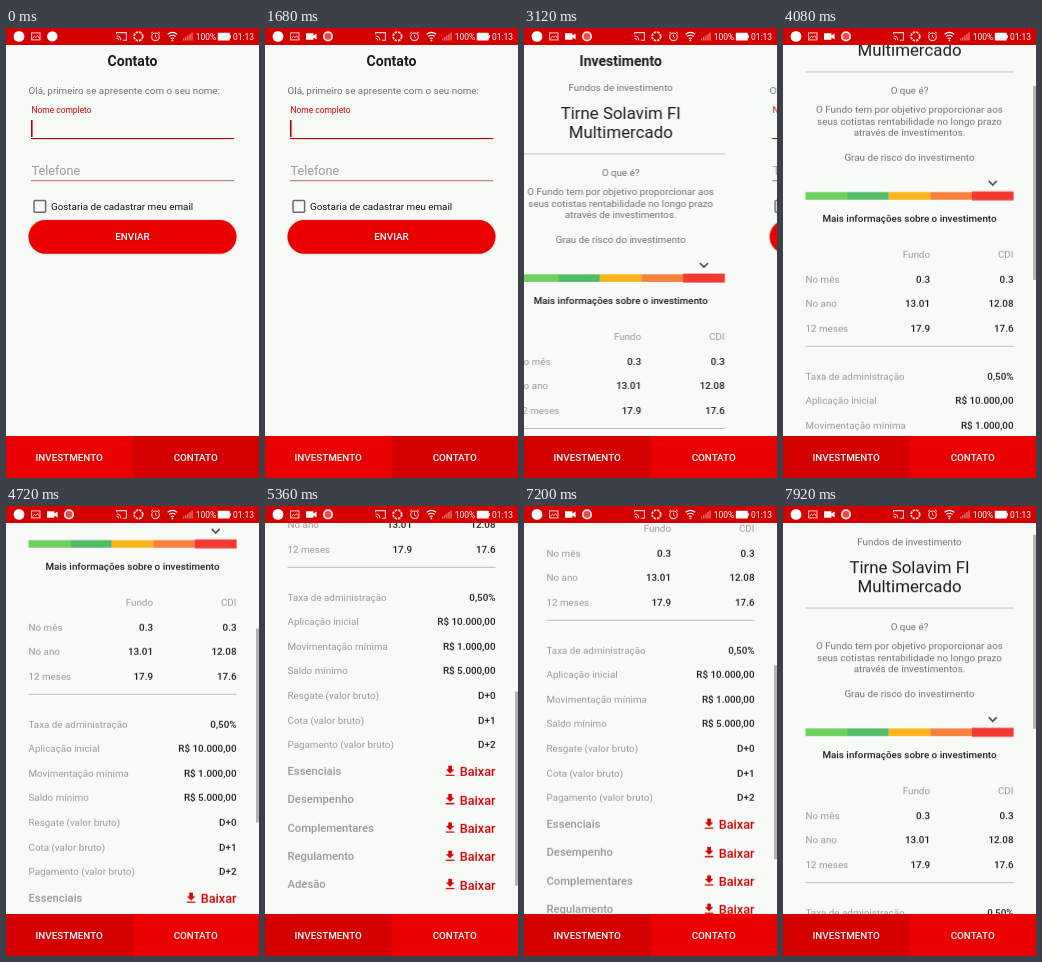
These frames come from a looping animation (253x450 px, 8 s). An HTML page:

```html
<!DOCTYPE html>
<html lang="pt-BR">
<head>
<meta charset="utf-8">
<title>Investimento</title>
<style>
  html, body { margin: 0; width: 100%; height: 100%; overflow: hidden; background: #f8faf8; }
  svg { display: block; width: 100vw; height: 100vh; }
  text { font-family: Roboto, sans-serif; font-size: 9.84px; white-space: pre; }
  .medium { font-weight: 500; }
  .bold { font-weight: 700; }
</style>
</head>
<body>
<svg id="stage" viewBox="0 0 253 450"></svg>
<script>
const LOOP = 8000;
const RED = '#eb0000', DARK = '#d40000', INK = '#1c1c1c', GREY = '#707070', PALE = '#979797';
const stage = document.getElementById('stage');

function add(parent, tag, attrs = {}, content) {
  const el = document.createElementNS('http://www.w3.org/2000/svg', tag);
  for (const key in attrs) el.setAttribute(key, attrs[key]);
  if (content !== undefined) el.textContent = content;
  parent.append(el);
  return el;
}
const group = (parent, attrs) => add(parent, 'g', attrs);
const rect = (parent, x, y, width, height, fill, more) =>
  add(parent, 'rect', { x, y, width, height, fill, ...more });
const circle = (parent, cx, cy, r, more) => add(parent, 'circle', { cx, cy, r, ...more });
const line = (parent, d, stroke, width = 1, more) =>
  add(parent, 'path', { d, stroke, 'stroke-width': width, fill: 'none', ...more });

function label(parent, content, x, y, fill, { size = 9.84, weight = '', anchor = 'start' } = {}) {
  return add(parent, 'text',
    { x, y, fill, class: weight, 'text-anchor': anchor, style: `font-size:${size}px` }, content);
}
const centred = (parent, content, y, fill, options) =>
  label(parent, content, 126.5, y, fill, { anchor: 'middle', ...options });
const rightAligned = (parent, content, x, y, fill, options) =>
  label(parent, content, x, y, fill, { anchor: 'end', ...options });

function button(parent, content, y) {
  rect(parent, 22.5, y, 208, 33.7, RED,
    { rx: 16.85, style: 'filter:drop-shadow(0 .7px 1px rgba(0,0,0,.28))' });
  centred(parent, content, y + 20.4, '#fff', { weight: 'medium' });
}

// Each step is [time in ms, value, easing to the next step].
function play(el, steps, toStyle) {
  const all = [[0, steps[0][1]], ...steps, [LOOP, steps.at(-1)[1]]];
  el.animate(all.map(([time, value, easing = 'linear']) =>
    ({ offset: time / LOOP, easing, ...toStyle(value) })),
    { duration: LOOP, iterations: Infinity });
}
const opacity = value => ({ opacity: value });
const HOLD = 'step-end';

function drawContact(parent) {
  const page = group(parent);
  centred(page, 'Contato', 38, INK, { size: 14.06, weight: 'bold' });
  label(page, 'Olá, primeiro se apresente com o seu nome:', 22.5, 65.8, GREY);
  label(page, 'Nome completo', 25.5, 84.8, DARK, { size: 8.44 });
  const cursor = rect(page, 25, 92, 1.6, 17, '#b00000');
  rect(page, 25, 110, 203, 1.1, '#b40000');
  label(page, 'Telefone', 25.5, 146.7, '#9d9d9d', { size: 12.65 });
  rect(page, 25, 152.2, 203, 1, '#b86a6a');
  rect(page, 28, 172.6, 11.6, 11.6, 'none', { rx: 1, stroke: '#6a6a6a', 'stroke-width': 1.5 });
  label(page, 'Gostaria de cadastrar meu email', 45, 182, '#111');
  button(page, 'ENVIAR', 192);
  play(cursor, [[0, 1, HOLD], [240, 0, HOLD], [720, 1, HOLD], [1200, 0, HOLD],
    [1680, 1, HOLD], [2160, 0, HOLD], [2640, 1, HOLD], [3120, 0, HOLD]], opacity);
  return page;
}

function drawFund(parent) {
  const page = group(parent);
  const body = group(page);
  centred(body, 'Investimento', 38, INK, { size: 14.06, weight: 'bold' });
  centred(body, 'Fundos de investimento', 63, GREY);
  centred(body, 'Tirne Solavim FI', 90.5, INK, { size: 16.87 });
  centred(body, 'Multimercado', 110.3, INK, { size: 16.87 });
  rect(body, 22.5, 125.5, 208, 1, '#bdbdbd');
  centred(body, 'O que é?', 148.3, GREY);
  ['O Fundo tem por objetivo proporcionar aos',
   'seus cotistas rentabilidade no longo prazo',
   'através de investimentos.'
  ].forEach((text, i) => centred(body, text, 167 + i * 11.6, GREY));
  centred(body, 'Grau de risco do investimento', 215.1, GREY);

  line(body, 'M205.7 235.1l4 4 4-4', '#444', 1.5);
  ['#6fd05f', '#52bb66', '#fbb41c', '#f7803a', '#f23a32'].forEach((fill, i) => {
    const grow = i === 4 ? 0.7 : 0;
    rect(body, 22.5 + i * 41.6, 246.3 - grow, 41.7, 7.6 + grow * 2, fill);
  });
  centred(body, 'Mais informações sobre o investimento', 276, INK, { weight: 'medium' });

  rightAligned(body, 'Fundo', 147, 312, PALE);
  rightAligned(body, 'CDI', 230.5, 312, PALE);
  [['No mês', '0.3', '0.3'], ['No ano', '13.01', '12.08'], ['12 meses', '17.9', '17.6']]
    .forEach(([name, fund, index], i) => {
      const y = 336.8 + i * 24.6;
      label(body, name, 22.5, y, PALE);
      rightAligned(body, fund, 147, y, INK, { weight: 'medium' });
      rightAligned(body, index, 230.5, y, INK, { weight: 'medium' });
    });
  rect(body, 22.5, 400, 208, 1, '#bdbdbd');

  [['Taxa de administração', '0,50%'], ['Aplicação inicial', 'R$ 10.000,00'],
   ['Movimentação mínima', 'R$ 1.000,00'], ['Saldo mínimo', 'R$ 5.000,00'],
   ['Resgate (valor bruto)', 'D+0'], ['Cota (valor bruto)', 'D+1'],
   ['Pagamento (valor bruto)', 'D+2']
  ].forEach(([name, value], i) => {
    const y = 433.6 + i * 24.6;
    label(body, name, 22.5, y, PALE);
    rightAligned(body, value, 230.5, y, INK, { weight: 'medium' });
  });

  ['Essenciais', 'Desempenho', 'Complementares', 'Regulamento', 'Adesão'].forEach((name, i) => {
    const y = 608 + i * 28.3;
    label(body, name, 22.5, y, PALE, { size: 11.25, weight: 'medium' });
    add(body, 'path', { fill: DARK,
      d: `M183.3 ${y - 9.2}h3.6v3.6h2.5l-4.3 4.3-4.3-4.3h2.5zM180.8 ${y - 0.2}h8.6v1.3h-8.6z` });
    rightAligned(body, 'Baixar', 230.5, y + 1.4, DARK, { size: 12.65, weight: 'medium' });
  });
  button(body, 'INVESTIR', 748.3);
  return { page, body };
}

function drawStatusBar() {
  const bar = group(stage);
  rect(bar, 0, 0, 253, 17, DARK);
  const faint = '#f8cccc';
  circle(bar, 13, 8.4, 5.4, { fill: '#fff' });
  rect(bar, 25.6, 4.9, 8.4, 7, 'none', { stroke: faint });
  line(bar, 'M26.5 10.6l2-2.4 1.5 1.4 1.6-2 2 3', faint, 0.9);

  const badge = circle(bar, 46.3, 8.4, 5.2, { fill: '#fff' });
  const recording = group(bar);
  add(recording, 'path', { fill: '#fff', d: 'M41 5.2h7.4v2.2l3.2-2v6.2l-3.2-2v2.2H41z' });
  circle(recording, 63, 8.4, 4.2, { fill: '#ee4a4a', stroke: '#ffe2e2', 'stroke-width': 1.8 });
  play(badge, [[160, 1], [320, 0]], opacity);
  play(recording, [[240, 0], [440, 1]], opacity);

  line(bar, 'M110.6 6.3V4.6h9.8v7.6h-3.6M110.6 8a4.2 4.2 0 0 1 4.2 4.2M110.6 10.2a2 2 0 0 1 2 2', faint, 1.1);
  circle(bar, 132.4, 8.4, 4.3, { fill: 'none', stroke: faint, 'stroke-width': 1.8, 'stroke-dasharray': '2.6 0.8' });
  circle(bar, 149.5, 8.8, 3.8, { fill: 'none', stroke: faint, 'stroke-width': 1.1 });
  line(bar, 'M149.5 6.6v2.5l1.6 1M145 5.5l2-1.7M154 5.5l-2-1.7', faint, 1);
  line(bar, 'M161.6 6.3q4.8-3.8 9.6 0M163.2 8.5q3.2-2.4 6.4 0M164.8 10.5q1.6-1 3.2 0', '#fff', 1.1);
  circle(bar, 166.4, 12.4, 0.9, { fill: '#fff' });
  for (let i = 0; i < 5; i++)
    rect(bar, 177 + i * 2.1, 10.5 - i * 1.5, 1.3, 2 + i * 1.5, '#ea7777');
  label(bar, '100%', 189.7, 11.6, '#fff', { size: 8.44 });
  rect(bar, 211.8, 4.7, 12, 7.8, '#fff', { rx: 0.7 });
  rect(bar, 223.5, 7, 1.3, 3.2, '#fff');
  rightAligned(bar, '01:13', 248, 11.6, '#fff', { size: 8.44 });
}

function drawTabs() {
  const tabs = group(stage);
  const left = rect(tabs, 0, 408, 127, 42, RED);
  const right = rect(tabs, 127, 408, 126, 42, DARK);
  label(tabs, 'INVESTMENTO', 63.2, 433, '#fff', { weight: 'medium', anchor: 'middle' });
  label(tabs, 'CONTATO', 189.7, 433, '#fff', { weight: 'medium', anchor: 'middle' });
  const fill = value => ({ fill: value });
  play(left, [[0, RED, HOLD], [2880, DARK, HOLD]], fill);
  play(right, [[0, DARK, HOLD], [2880, RED, HOLD]], fill);
}

rect(stage, 0, 0, 253, 450, '#f8faf8');
const contact = drawContact(stage);
const fund = drawFund(stage);
const glow = add(stage, 'ellipse', { cx: 126.5, cy: 408, rx: 178, ry: 15.5, fill: RED,
  style: 'transform-origin:126.5px 408px' });
const thumb = rect(stage, 250, 17, 3, 194, '#b2b4b2');
drawTabs();
drawStatusBar();

const swipe = [[2520, 0], [2640, 22], [2800, 92], [2960, 168], [3040, 202],
  [3120, 223], [3200, 239], [3280, 248], [3360, 253]];
play(contact, swipe, x => ({ transform: `translate(${x}px,0)` }));
play(fund.page, swipe, x => ({ transform: `translate(${x - 253}px,0)` }));

const scroll = [[3680, 0], [3840, 24], [4080, 82], [4400, 150], [4720, 212], [5040, 284],
  [5360, 339], [5600, 374], [5840, 396.5], [6880, 396.5], [7040, 360], [7280, 250],
  [7520, 136], [7760, 58], [7920, 24], [7999, 14]];
play(fund.body, scroll, y => ({ transform: `translate(0,${-y}px)` }));
play(thumb, scroll, y => ({ transform: `translate(0,${y * 0.497}px)` }));
play(thumb, [[3680, 0], [3760, 1]], opacity);
play(glow, [[5840, 0], [6160, 1], [6560, 1], [6880, 0]],
  v => ({ opacity: v * 0.09, transform: `scale(1,${v})` }));
</script>
</body>
</html>
```
